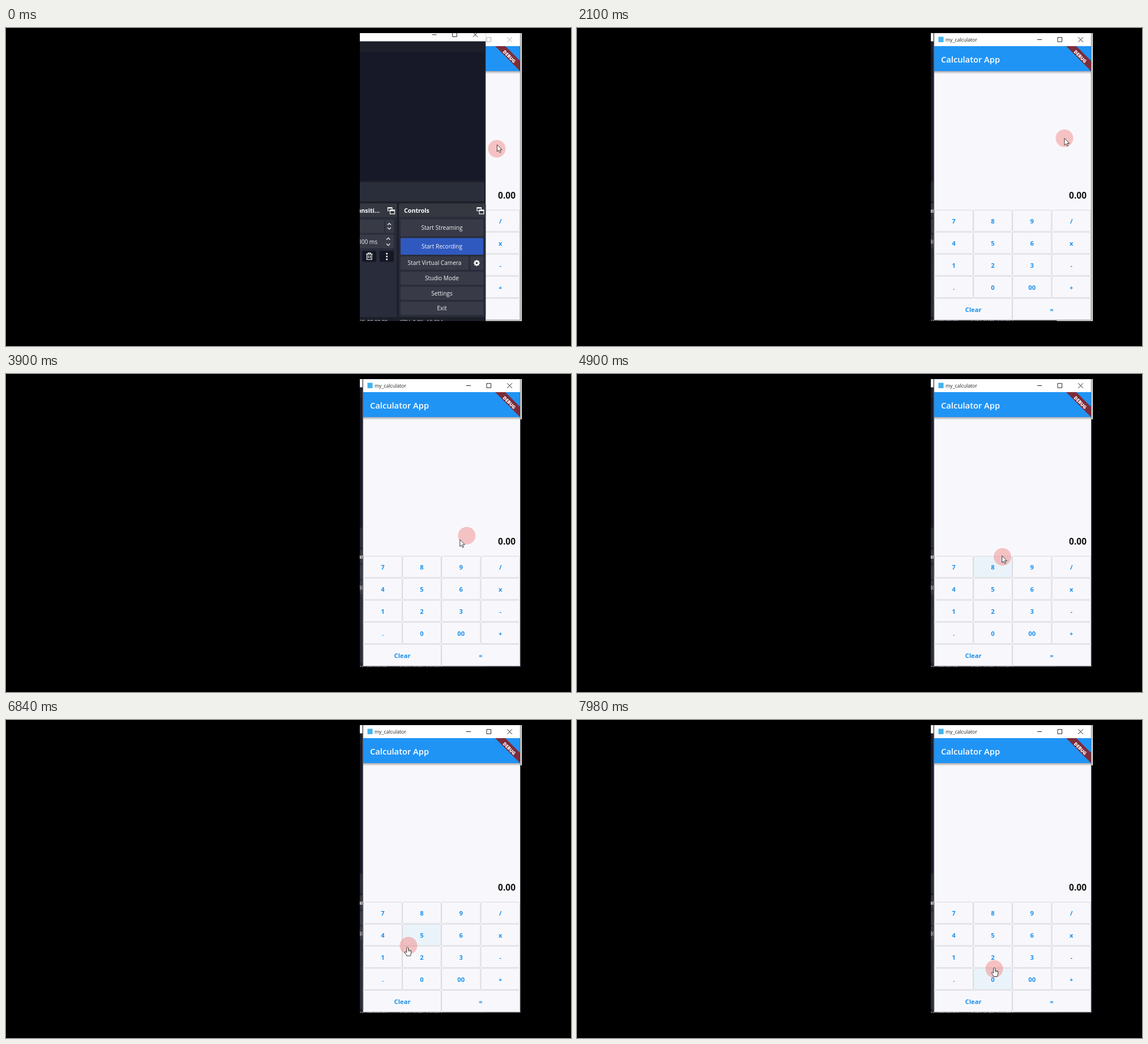
Recreate the animation shown at these times as an HTML page. Size 998 by 561 pixels, loop 8 s.

```html
<!DOCTYPE html>
<html lang="en">
<head>
<meta charset="utf-8">
<title>Calculator recording</title>
<style>
html, body { margin: 0; width: 100%; height: 100%; overflow: hidden; background: #000; }
svg { display: block; width: 100vw; height: 100vh; }
text { font-family: "Open Sans", "Noto Sans", sans-serif; }
</style>
</head>
<body>
<svg viewBox="0 0 998 561">
  <defs>
    <clipPath id="screen"><rect x="625" y="9" width="286" height="508"/></clipPath>
    <clipPath id="obsBox"><rect x="620" y="5" width="227.5" height="520"/></clipPath>
    <linearGradient id="fade" x2="0" y2="1">
      <stop stop-color="#555" stop-opacity=".5"/><stop offset="1" stop-color="#555" stop-opacity="0"/>
    </linearGradient>
  </defs>
  <g clip-path="url(#screen)">
    <rect x="625" y="9" width="286" height="508" fill="#0b0d14"/>
    <rect id="strip" x="847" y="9" width="64" fill="#eeeee8"/>
    <g id="scene"><g id="calc"></g><g id="obs" clip-path="url(#obsBox)"></g></g>
  </g>
  <circle id="halo" r="15.5" fill="#f0645f"/>
  <g id="pointer" fill="#fff" stroke="#222" stroke-width=".9" stroke-linejoin="round">
    <path id="arrow" d="M0 0V12.2L2.8 9.7 4.7 14 6.7 13.1 4.8 8.9H8.7Z"/>
    <g id="hand">
      <path d="M-1.5 1.1Q0-1 1.5 1.1V5L5.8 6Q7.2 6.4 7 8.2L6.3 12 5.4 15.5H-1.2Q-1.8 13-4.8 9.6-4.9 7.8-3.2 8.2L-1.5 9.8Z"/>
      <path d="M1.5 5V8M3.4 5.6V8.2M5.3 6V8.4" stroke-width=".6"/>
    </g>
  </g>
</svg>
<script>
const $ = id => document.getElementById(id);
const LOOP = 8000, LAG = 50;
const RECORD_AT = 420, CLICK_AT = 1100, SWAP_AT = 1240, STRIP_AT = 2700;

const rect = (x, y, x2, y2, fill, more = '') =>
  `<rect x="${x}" y="${y}" width="${x2 - x}" height="${y2 - y}" fill="${fill}" ${more}/>`;
const text = (s, x, y, size, fill, weight = 400, anchor = 'middle', more = '') =>
  `<text x="${x}" y="${y}" font-size="${size}" fill="${fill}" font-weight="${weight}" text-anchor="${anchor}" ${more}>${s}</text>`;
const line = (d, color, width = 1, more = '') =>
  `<path d="${d}" fill="none" stroke="${color}" stroke-width="${width}" ${more}/>`;

// Calculator window
const COLS = [631, 700, 769, 838.5, 908];
const ROWS = [320.7, 359.6, 398.5, 437.4, 476.3, 515.2];
const keys = [...'789/456x123-.0', '00', '+'].map((label, i) => {
  const c = i % 4, r = i >> 2;
  return { label, x: COLS[c], x2: COLS[c + 1], y: ROWS[r], y2: ROWS[r + 1] };
});
keys.push({ label: 'Clear', x: 631, x2: 769, y: ROWS[4], y2: ROWS[5] },
          { label: '=', x: 769, x2: 908, y: ROWS[4], y2: ROWS[5] });

const keyMarkup = k =>
  rect(k.x + .6, k.y + .6, k.x2 - .6, k.y2 - .6, '#f8f8fc', 'class="key" rx="2" stroke="#d9d9db"') +
  text(k.label, (k.x + k.x2) / 2, (k.y + k.y2) / 2 + 4.8, 11.2, '#1b90ee', 700);

$('calc').innerHTML =
  rect(629.5, 9, 908.8, 516, '#55575c') +
  rect(631, 9, 908, 515.3, '#f8f8fc') +
  rect(631, 10, 908, 32, '#fff') +
  rect(638.5, 15.5, 647.5, 25, '#42b4ee') +
  text('my_calculator', 651, 24.2, 8.7, '#222', 400, 'start') +
  line('M813 20.5h8M849 16.7h7.6v7.6h-7.6zM885.3 16.3l8.6 8.6m0-8.6l-8.6 8.6', '#222', 1, 'id="calcIcons"') +
  rect(631, 76, 908, 81, 'url(#fade)') +
  rect(631, 32, 908, 76, '#2094f5') +
  text('Calculator App', 643, 61, 14.7, '#fff', 600, 'start') +
  '<path d="M864 32H882L908 58V76Z" fill="#7c2c3a"/>' +
  text('DEBUG', 0, 2.9, 8.1, '#fff', 800, 'middle', 'transform="translate(889 50.3) rotate(45)"') +
  text('0.00', 900, 301.3, 15.5, '#151515', 700, 'end') +
  keys.map(keyMarkup).join('');

// Recorder window
const button = (x, y, x2, y2, label, fill = '#383b47') =>
  rect(x, y, x2, y2, fill, 'rx="2"') +
  text(label, (x + x2) / 2, (y + y2) / 2 + 3.7, 10.1, '#f4f4f6');
const dockIcon = x =>
  line(`M${x} 316.8h7.5v5.7h-7.5z`, '#fff', 1.2) + line(`M${x} 317.5h7.5`, '#fff', 1.8) +
  rect(x + 4, 321, x + 12, 328, '#353841', 'stroke="#fff" stroke-width="1.2"') +
  line(`M${x + 4} 322h8`, '#fff', 1.8);
const spokes = Array.from({ length: 8 }, (_, i) => {
  const a = i * Math.PI / 4, c = Math.cos(a), s = Math.sin(a);
  return `M${831.5 + 3 * c} ${414.6 + 3 * s}L${831.5 + 5.4 * c} ${414.6 + 5.4 * s}`;
}).join('');

$('obs').innerHTML =
  rect(620, 9, 847.5, 517, '#1d1f29') +
  rect(620, 9, 847.5, 23.5, '#fcfcfc') +
  line('M752.5 11.8h8M788.7 7.7h7.6v7.6h-7.6zM825 7.8l8 8m0-8l-8 8', '#222') +
  rect(620, 42, 845, 269, '#171929') +
  rect(620, 272, 845, 306, '#2a2e3a', 'rx="2"') +
  rect(620, 309.5, 690.5, 510, '#282c3b', 'rx="2"') +
  rect(620, 309.5, 690.5, 333.5, '#353841', 'rx="2"') +
  rect(694, 309.5, 847.5, 510, '#292d3a', 'rx="2"') +
  rect(694, 309.5, 847.5, 333.5, '#353841', 'rx="2"') +
  text('Transiti...', 660, 325.7, 10.7, '#fff', 700, 'end') +
  text('Controls', 703, 325.7, 10.7, '#fff', 700, 'start') +
  dockIcon(674.5) + dockIcon(832) +
  rect(620, 338, 685, 361.5, '#383b46', 'rx="2"') +
  rect(620, 364.5, 685, 388.5, '#383b46', 'rx="2"') +
  line('M669 339v22', '#20232e') +
  line('M674 347.5l3-3 3 3M674 352l3 3 3-3M672 373.5l3.2-3.2 3.2 3.2M672 380.5l3.2 3.2 3.2-3.2', '#fff', 1.1) +
  text('300 ms', 656, 380.6, 10.1, '#f4f4f6', 400, 'end') +
  rect(629, 393, 654, 412.5, '#151824', 'rx="2"') +
  rect(660, 393, 685, 412.5, '#151824', 'rx="2"') +
  line('M636 398.8h11.5M639.5 398.5v-1.7h4.5v1.7M637.5 399v9.5h8.5v-9.5M640.2 401.2v5M643.4 401.2v5', '#fff', 1.2) +
  [398, 403, 408].map(y => `<circle cx="672.7" cy="${y}" r="1.5" fill="#fff"/>`).join('') +
  button(697, 337.5, 843, 367.5, 'Start Streaming') +
  '<g id="idle">' + button(697, 370.5, 843, 400, 'Start Recording', '#3059bf') + '</g>' +
  '<g id="live">' + button(697, 370.5, 810.5, 400, 'Stop Recording', '#2348b2') +
    button(814, 370.5, 843, 400, '', '#2f323f') +
    rect(823.7, 380, 827.4, 390.5, '#fff') + rect(829.4, 380, 833.1, 390.5, '#fff') + '</g>' +
  button(697, 403, 817, 426.5, 'Start Virtual Camera') +
  button(820, 403, 843, 426.5, '') +
  '<circle cx="831.5" cy="414.6" r="3" fill="none" stroke="#fff" stroke-width="2.2"/>' +
  line(spokes, '#fff', 2.2) +
  button(697, 430, 843, 453, 'Studio Mode') +
  button(697, 456.5, 843, 479.5, 'Settings') +
  button(697, 483, 843, 506, 'Exit') +
  text('REC: 00:00:00', 674, 522.3, 9, '#e4e4e8', 400, 'end', 'id="clock"') +
  text('CPU: 0.0%, 60.00 fps', 696, 522.3, 9, '#e4e4e8', 400, 'start', 'id="cpu"');

// Pointer path: time, x, y
const TRACK = [
  [-50, 867, 213], [0, 867.5, 206], [60, 864, 199], [200, 861, 194.5], [3380, 861, 194.5],
  [3480, 856, 208], [3680, 838, 254], [3850, 814, 285], [3900, 802, 292], [4080, 778, 313],
  [4260, 768, 331], [4500, 761, 335], [5000, 750, 319], [5880, 750, 319],
  [6060, 752, 348], [6280, 748, 446], [6400, 742, 452], [6640, 722, 390], [6730, 716, 387],
  [6790, 711, 398], [6840, 709, 400.5], [7050, 716, 438], [7300, 734, 455], [7600, 737, 455],
  [7930, 737, 439], [7980, 737, 437], [8050, 737, 433]
];

function slope(i, k) {
  const a = TRACK[i - 1], p = TRACK[i], b = TRACK[i + 1];
  if (!a || !b) return 0;
  const before = (p[k] - a[k]) / (p[0] - a[0]), after = (b[k] - p[k]) / (b[0] - p[0]);
  return before * after <= 0 ? 0 : 2 * before * after / (before + after);
}

function pointerAt(t) {
  let i = 0;
  while (i < TRACK.length - 2 && TRACK[i + 1][0] <= t) i++;
  const a = TRACK[i], b = TRACK[i + 1], d = b[0] - a[0], u = (t - a[0]) / d;
  return [1, 2].map(k =>
    a[k] + (b[k] - a[k]) * u * u * (3 - 2 * u) +
    d * u * (1 - u) * ((1 - u) * slope(i, k) - u * slope(i + 1, k)));
}

const keyRects = [...document.querySelectorAll('.key')];
const show = (el, on) => el.setAttribute('visibility', on ? 'visible' : 'hidden');
let topWindow = null;

function draw(t) {
  const front = t < SWAP_AT ? $('obs') : $('calc');
  if (front !== topWindow) $('scene').append(topWindow = front);
  $('calcIcons').setAttribute('stroke', t < SWAP_AT ? '#aaa' : '#222');
  $('strip').setAttribute('height', t < STRIP_AT ? 508 : 71);
  show($('idle'), t < RECORD_AT);
  show($('live'), t >= RECORD_AT);
  $('clock').textContent = 'REC: 00:00:0' + (t < STRIP_AT ? 0 : t < 5500 ? 1 : 3);
  $('cpu').textContent = `CPU: 0.${t < 7800 ? 0 : 4}%, 60.00 fps`;

  const [x, y] = pointerAt(t), [hx, hy] = pointerAt(t - LAG);
  $('pointer').setAttribute('transform', `translate(${x} ${y})`);
  $('halo').setAttribute('cx', hx);
  $('halo').setAttribute('cy', hy);
  $('halo').setAttribute('opacity', t >= CLICK_AT && t < SWAP_AT ? .43 : .36);
  show($('arrow'), y < ROWS[0]);
  show($('hand'), y >= ROWS[0]);
  keys.forEach((k, i) => {
    const over = hx >= k.x && hx < k.x2 && hy >= k.y && hy < k.y2;
    keyRects[i].setAttribute('fill', over ? '#ebf3fa' : '#f8f8fc');
  });
}

const start = performance.now();
function tick() {
  draw((performance.now() - start) % LOOP);
  requestAnimationFrame(tick);
}
tick();
</script>
</body>
</html>
```
